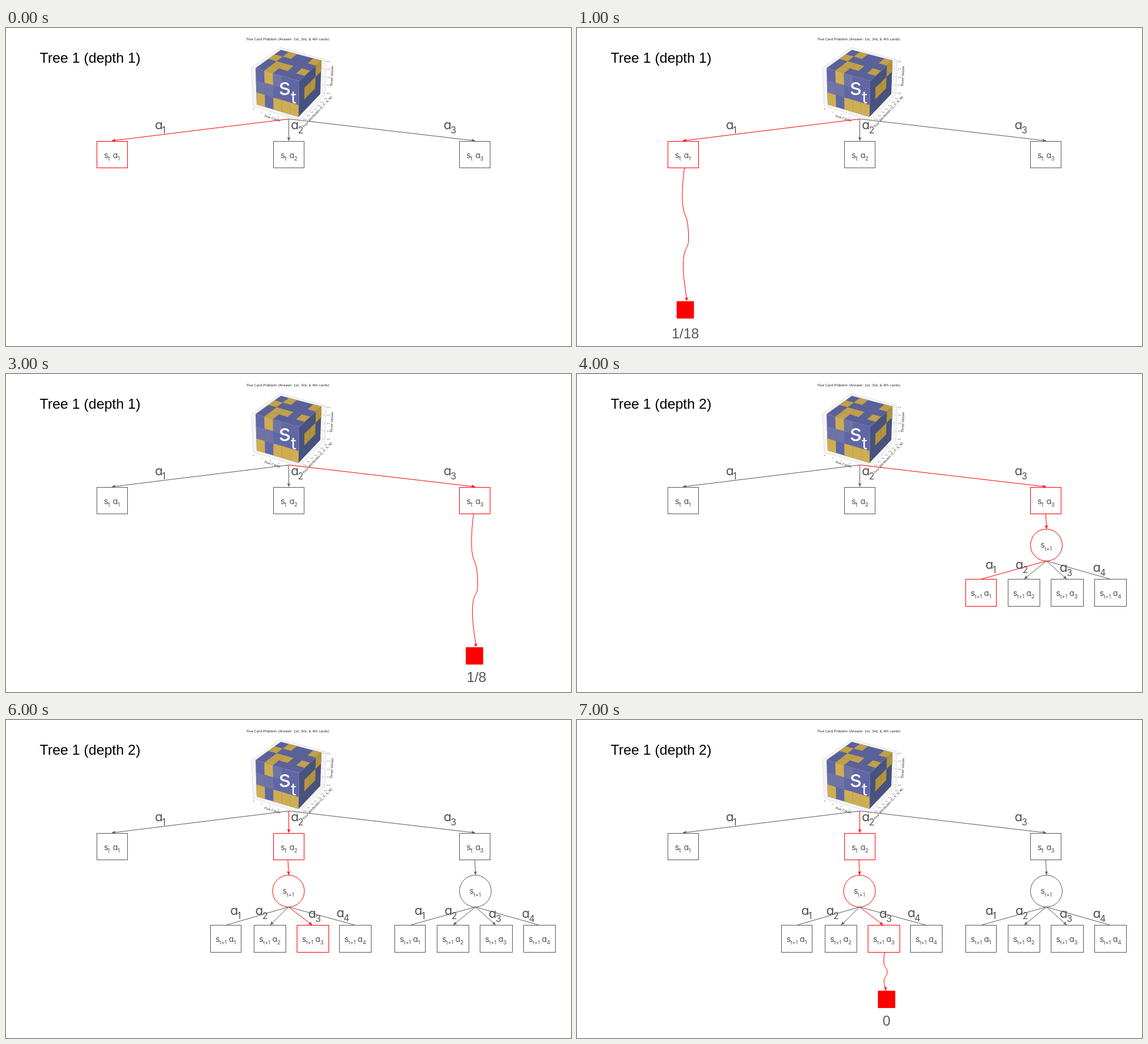
These frames come from a looping animation (960x540 px, 8 s). An HTML page:

```html
<!DOCTYPE html>
<html lang="en">
<head>
<meta charset="utf-8">
<title>Tree search</title>
<style>
  html, body { margin: 0; width: 100%; height: 100%; overflow: hidden; background: #fff; }
  svg { display: block; width: 960px; height: 540px; }
  .sans { font-family: "Liberation Sans", Arial, sans-serif; font-size: 24px; }
  .hand { font-family: Inter, sans-serif; font-feature-settings: "cv11"; fill: #505050; }
  .plot { font-family: "DejaVu Sans", sans-serif; font-size: 5.4px; fill: #222; text-anchor: middle; }
</style>
</head>
<body>
<svg viewBox="0 0 960 540" xmlns="http://www.w3.org/2000/svg">
  <g id="cube"></g>
  <g id="scene"></g>
</svg>
<script>
const RED = '#ff0000', GREY = '#595959';
const STEP_MS = 1000;
const STEPS = [
  { depth: 1, top: 0 },
  { depth: 1, top: 0, value: '1/18' },
  { depth: 1, top: 1, value: '1/18' },
  { depth: 1, top: 2, value: '1/8' },
  { depth: 2, top: 2, leaf: 0, trees: [2] },
  { depth: 2, top: 2, leaf: 0, trees: [2], value: '0' },
  { depth: 2, top: 1, leaf: 2, trees: [2, 1] },
  { depth: 2, top: 1, leaf: 2, trees: [2, 1], value: '0' }
];

// Per branch: box left, arrow tip, label x, label baseline, rollout centre
const TOPS = [
  { x: 154.5, tip: 180, lx: 253, ly: 172, roll: 184 },
  { x: 454.5, tip: 480.5, lx: 484, ly: 171.5, roll: 484 },
  { x: 770.5, tip: 797, lx: 743.5, ly: 172, roll: 796 }
];
// Per subtree: centre, then [box left, width, arrow tip, label x, label baseline]
const TREES = {
  1: { cx: 480, leaves: [
    [347.5, 52, 375, 381, 331], [421.5, 54, 449, 423.5, 331],
    [494.5, 54, 520, 513.5, 335.5], [566.5, 54, 592, 561.5, 335] ] },
  2: { cx: 797.5, leaves: [
    [660.5, 52, 688, 694, 331], [732.5, 54, 760, 745, 330.5],
    [805.5, 55, 832, 820, 336], [879.5, 54, 905, 876.5, 336] ] }
};

const span = (x, y, size, s) => `<tspan x="${x}" y="${y}" font-size="${size}">${s}</tspan>`;
const hand = (...spans) => `<text class="hand">${spans.join('')}</text>`;
const poly = (pts, fill, extra = '') => `<polygon points="${pts.join(' ')}" fill="${fill}" ${extra}/>`;
const stroke = (d, c) => `<path d="${d}" fill="none" stroke="${c}"/>`;
const box = (x, y, w, h, c) => `<rect x="${x}" y="${y}" width="${w}" height="${h}" fill="#fff" stroke="${c}"/>`;
const head = (x, y, deg, c) =>
  `<path d="M0 0L-6.5 -3L-4.6 0L-6.5 3Z" fill="${c}" transform="translate(${x} ${y}) rotate(${deg})"/>`;

function arrow(x1, y1, x2, y2, c, tip = true) {
  const deg = Math.atan2(y2 - y1, x2 - x1) * 180 / Math.PI;
  return stroke(`M${x1} ${y1}L${x2} ${y2}`, c) + (tip ? head(x2, y2, deg, c) : '');
}

const action = (n, x, y) => hand(span(x, y, 22, 'a'), span(x + 12, y + 7, 15.5, n));

function rollout(x, long, value) {
  const d = long
    ? 'M-1.5 238C-5 262 -6 290 -4 303C-2 318 2 318 4 333C6 348 6 362 4.5 368C3 374 -1 376 -2.5 388C-5 405 -3 425 2.8 463'
    : 'M-3.5 395C-4.5 402 -5.5 410 -4 416C-2 421 1 422 1 429C1 435 -3 435 -4 441C-5 447 -3 452 -1 460';
  const y = long ? 464 : 459.7;
  const base = !long ? 518.5 : value.length > 3 ? 527 : 523;
  return `<g transform="translate(${x} 0)">` + stroke(d, RED) +
    head(long ? 2.8 : -1, y - 0.5, 80, RED) +
    `<rect x="-14.7" y="${y}" width="29.4" height="29.4" fill="${RED}"/>` +
    `<text class="sans" x="${long && value.length < 4 ? 3.5 : 0}" y="${base}" text-anchor="middle" fill="${GREY}">${value}</text></g>`;
}

function subtree(id, hotLeaf) {
  const { cx, leaves } = TREES[id];
  const main = hotLeaf !== undefined ? RED : GREY;
  let out = arrow(cx - 1, 238, cx + 0.3, 263, main) +
    `<circle cx="${cx}" cy="290.5" r="27" fill="#fff" stroke="${main}"/>` +
    hand(span(cx - 10, 295, 14, 's'), span(cx - 3, 299.5, 9, 't+1'));
  leaves.forEach(([x, w, tip, lx, ly], i) => {
    const c = i === hotLeaf ? RED : GREY;
    out += arrow(cx, 317.5, tip, 348, c, i === 1 || i === 2) + box(x, 348.5, w, 46, c) +
      hand(span(x + 8.5, 376.5, 14, 's'), span(x + 15.5, 381, 8.8, 't+1'),
        span(x + 31, 376.5, 14, 'a'), span(x + 39.2, 381, 9.5, i + 1)) +
      action(i + 1, lx, ly);
  });
  return out;
}

function scene({ depth, top, leaf, trees = [], value }) {
  let out = `<text class="sans" x="57.2" y="58.6">Tree 1 (depth ${depth})</text>`;
  const order = [0, 1, 2].sort((a, b) => (a === top) - (b === top));
  for (const i of order) {
    const { x, tip, lx, ly } = TOPS[i];
    const c = i === top ? RED : GREY;
    out += arrow(480.5, 154.5, tip, 191.5, c) + box(x, 192.5, 52, 45, c) +
      hand(span(x + 12, 220.5, 14, 's'), span(x + 19, 225, 10, 't'),
        span(x + 27, 220.5, 14, 'a'), span(x + 35, 225, 9.5, i + 1)) +
      action(i + 1, lx, ly);
  }
  for (const id of trees) out += subtree(id, id === top ? leaf : undefined);
  if (value) {
    const x = depth === 1 ? TOPS[top].roll : leaf === 0 ? 686 : 526;
    out += rollout(x, depth === 1, value);
  }
  return out;
}

// Face of the cube as a cols x rows grid between four corners
function face([a, b, c, d], cols, rows, blue, gold, cells, pale = []) {
  const at = (u, v) => [0, 1].map(k =>
    ((a[k] * (1 - u) + b[k] * u) * (1 - v) + (d[k] * (1 - u) + c[k] * u) * v).toFixed(1));
  const cell = (i, j, fill) => poly([
    at(i / cols, j / rows), at((i + 1) / cols, j / rows),
    at((i + 1) / cols, (j + 1) / rows), at(i / cols, (j + 1) / rows)], fill);
  return poly([a, b, c, d], blue) +
    cells.map(([i, j]) => cell(i, j, gold)).join('') +
    pale.map(([i, j]) => cell(i, j, '#6f74a4')).join('');
}

function cube() {
  const tl = [424, 68], tr = [498, 90], br = [497, 151], bl = [426, 130];
  const backL = [467, 37], backR = [536, 55], lowR = [534, 112];
  let out = poly([[417, 68], [466, 33], [544, 54], [542, 113], [499, 157], [420, 133]],
    '#f5f5f5', 'stroke="#d4d4d4" stroke-width=".7"');
  for (let i = 0; i < 5; i++) {
    const y = 57 + i * 13.5;
    out += stroke(`M536 ${y - 2}L544 ${y}`, '#ddd') +
      `<text class="plot" x="548" y="${y + 0.5}" style="font-size:3px">${(2 - i / 2).toFixed(1)}</text>` +
      `<text class="plot" x="${421 + i * 14}" y="${139 + i * 4.5}" style="font-size:3px">${i}</text>`;
  }
  for (let i = 0; i < 7; i++)
    out += `<text class="plot" x="${508 + i * 5.8}" y="${156 - i * 5.8}" style="font-size:3px">${(i / 2).toFixed(1)}</text>`;
  out += face([tl, tr, backR, backL], 5, 4, '#5a6199', '#c0a04a',
    [[1, 3], [0, 2], [1, 1], [2, 1], [1, 0], [4, 1], [4, 3]]);
  out += face([tl, tr, br, bl], 5, 3, '#6067a5', '#cfae52',
    [[1, 0], [0, 2], [2, 2], [3, 2], [4, 2]], [[0, 1], [2, 0], [1, 1]]);
  out += face([tr, backR, lowR, br], 4, 3, '#48527f', '#b3943c', [[1, 1], [2, 1], [3, 0]]);
  const label = (x, y, deg, s) =>
    `<text class="plot" transform="translate(${x} ${y}) rotate(${deg})">${s}</text>`;
  out += `<text class="plot" x="479" y="20.5" style="font-size:5.7px">Five Card Problem (Answer: 1st, 3rd, &amp; 4th cards)</text>` +
    label(452, 155, 17, 'Five Cards') + label(555.5, 82, -88, 'Three Values') +
    label(530.5, 143.5, -47, 'Four Attributes (C, F, S, N)');
  return out + `<text class="hand" style="fill:#fff">${span(463, 113.5, 40, 's')}${span(484, 128, 29, 't')}</text>`;
}

document.getElementById('cube').innerHTML = cube();
const stage = document.getElementById('scene');
const start = performance.now();
let shown = -1;

function tick() {
  const i = Math.floor((performance.now() - start) / STEP_MS) % STEPS.length;
  if (i !== shown) stage.innerHTML = scene(STEPS[shown = i]);
  requestAnimationFrame(tick);
}
tick();
</script>
</body>
</html>
```
